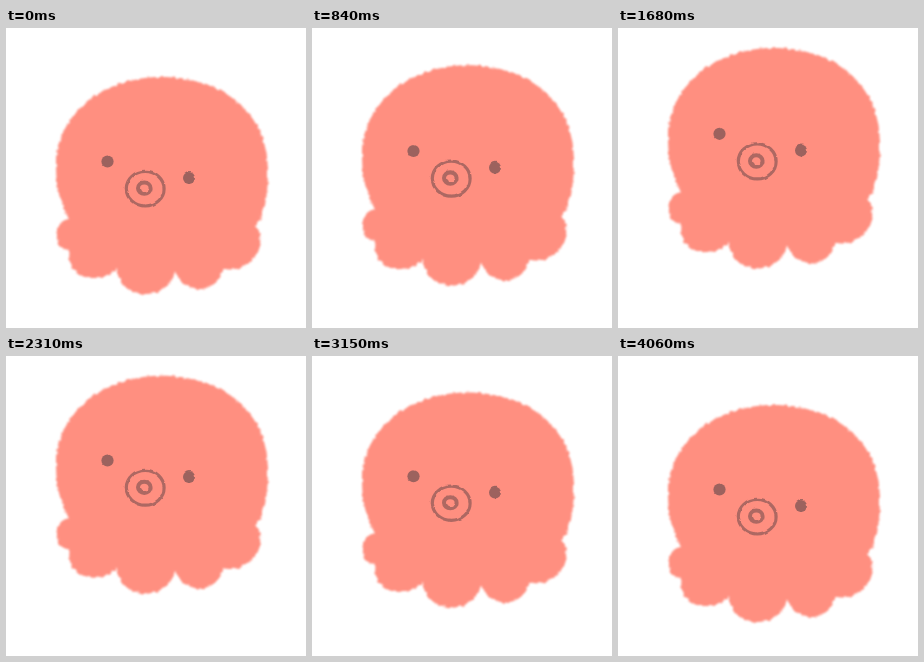
Write an HTML page that moves like this. It is 300 px wide and 300 px high and loops after 4270 ms.

```html
<!DOCTYPE html>
<html lang="en">
<head>
<meta charset="utf-8">
<title>Bobbing octopus</title>
<style>
  html, body { margin: 0; width: 100%; height: 100%; overflow: hidden; background: #fff; }
  svg { display: block; width: 100vw; height: 100vh; }
</style>
</head>
<body>
<svg viewBox="0 0 300 300">
  <defs>
    <filter id="crayon" filterUnits="userSpaceOnUse" x="30" y="30" width="250" height="255" color-interpolation-filters="sRGB">
      <feTurbulence type="fractalNoise" baseFrequency="0.2" numOctaves="2" seed="7" result="grain"/>
      <feDisplacementMap in="SourceGraphic" in2="grain" scale="4" xChannelSelector="R" yChannelSelector="G"/>
      <feGaussianBlur stdDeviation="1"/>
    </filter>
    <filter id="pencil" filterUnits="userSpaceOnUse" x="80" y="110" width="130" height="90" color-interpolation-filters="sRGB">
      <feTurbulence type="fractalNoise" baseFrequency="0.15" numOctaves="2" seed="3" result="grain"/>
      <feDisplacementMap in="SourceGraphic" in2="grain" scale="2.5" xChannelSelector="R" yChannelSelector="G"/>
      <feGaussianBlur stdDeviation="0.7"/>
    </filter>
  </defs>
  <g id="octopus">
    <path filter="url(#crayon)" fill="#ff8f80" d="M155 49
      C217 49 262 85 262 142 C262 170 258 186 250 199
      C254 203 255 210 254 217 C252 233 234 246 216 240
      C217 251 206 261 193 261 C181 260 172 253 169 243
      C168 255 154 266 141 266 C125 266 111 256 111 240
      C104 248 95 250 86 250 C72 249 60 238 64 222
      C55 222 50 215 51 206 C51 197 56 192 63 191
      C53 175 50 155 50 137 C50 88 96 49 155 49Z"/>
    <g filter="url(#pencil)">
      <g fill="#9c625e">
        <ellipse cx="101.5" cy="133.5" rx="6.1" ry="6"/>
        <ellipse cx="183" cy="150" rx="6" ry="6"/>
      </g>
      <g fill="none" stroke="#ad6862">
        <ellipse cx="139.2" cy="160.7" rx="18.9" ry="17.3" stroke-width="3.2"/>
        <ellipse cx="138.3" cy="160.2" rx="6.3" ry="5.6" stroke-width="4"/>
      </g>
    </g>
  </g>
</svg>
<script>
  const LOOP = 4270, STEP = 70, START = 140, END = 4060;
  const TOP = 49, HEIGHT = 217;
  const octopus = document.getElementById('octopus');

  // Height of a smooth hop that peaks at the given time.
  const hop = (t, peak, height) =>
    height * (1 + Math.cos(2 * Math.PI * (t - peak) / END)) / 2;

  function draw(ms) {
    const t = Math.floor((ms % LOOP) / STEP) * STEP;
    const moving = t >= START && t < END;
    // The tentacles trail the head, so the body stretches a little.
    const head = moving ? hop(t, 2010, 31) : 0;
    const feet = moving ? hop(t, 2130, 29) : 0;
    const stretch = (HEIGHT + head - feet) / HEIGHT;
    octopus.setAttribute('transform',
      `translate(0 ${TOP - head}) scale(1 ${stretch}) translate(0 ${-TOP})`);
  }

  const begin = performance.now();
  function tick() {
    draw(performance.now() - begin);
    requestAnimationFrame(tick);
  }
  tick();
</script>
</body>
</html>
```
